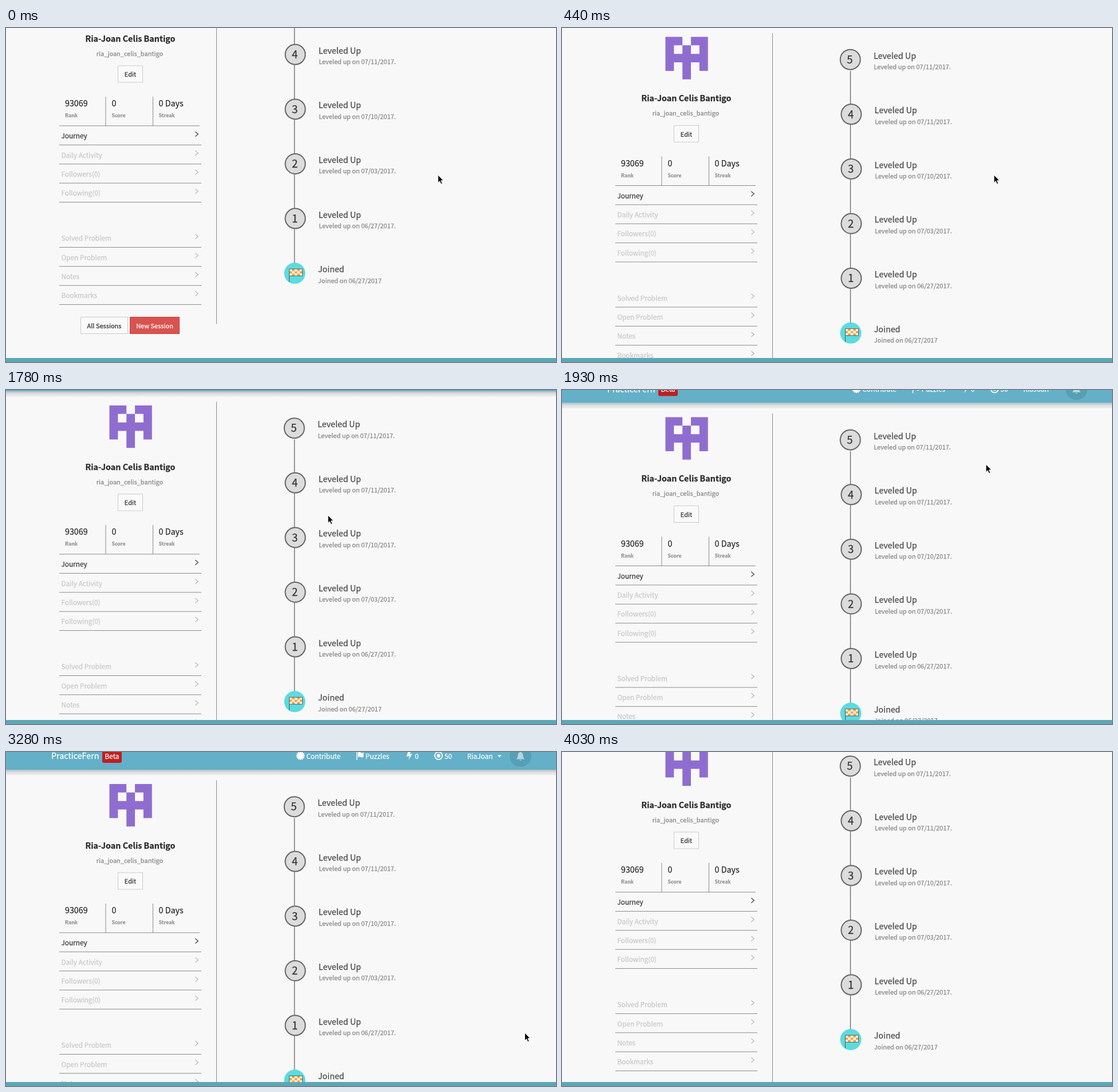
An HTML page that plays this animation: 960 px wide and 584 px high, repeating every 4480 ms.

```html
<!DOCTYPE html>
<html lang="en">
<head>
<meta charset="utf-8">
<title>Profile journey</title>
<style>
  html, body { margin: 0; width: 100%; height: 100%; overflow: hidden; background: #f8f8f8; }
  svg { display: block; width: 960px; height: 584px; }
  text { font-family: "Noto Sans CJK SC", "Noto Sans CJK JP", "Noto Sans CJK", "Open Sans", sans-serif; white-space: pre; stroke-width: .25px; }
</style>
</head>
<body>
<svg id="stage" viewBox="0 0 960 584">
  <defs>
    <linearGradient id="shade" x2="0" y2="1">
      <stop stop-color="#b4bec1"/><stop offset=".45" stop-color="#dcdedf"/><stop offset="1" stop-color="#efefef"/>
    </linearGradient>
  </defs>
  <g id="page"></g>
  <rect y="577" width="960" height="7" fill="#5ba8b5"/>
  <path id="cursor" d="M0 0V13.5L3.1 10.7 5.3 15.7 7.6 14.7 5.4 9.8H9.5Z" fill="#000" stroke="#fff" stroke-width=".9"/>
</svg>
<script>
const page = document.getElementById('page');
const cursor = document.getElementById('cursor');
const LOOP = 4480;

// Page offset: [start ms, y]
const scroll = [
  [0, -104.5], [140, -80], [290, -25], [440, 0], [1780, 11.5],
  [1930, 32], [2230, 40.5], [3580, 2], [3730, -14], [3880, -30.5]
];

// Pointer tip: [start ms, x, y]
const pointer = [
  [0, 754, 257], [740, 356, 296], [890, 235, 113], [1040, 194, 186],
  [1190, 147, 15], [1340, 232, 124], [1490, 276, 173], [1630, 562, 219],
  [1930, 740, 130], [2230, 890, 56], [2380, 882, 53], [2530, 823, -2],
  [2680, 900, 237], [2980, 918, 510], [3130, 926, 533], [3280, 905.5, 491],
  [3880, 928, 566], [4030, -50, -50]
];

let out = '';
const add = s => { out += s; };
const text = (x, y, s, size, fill, extra = '') =>
  add(`<text x="${x}" y="${y}" font-size="${size}" fill="${fill}" stroke="${fill}" ${extra}>${s}</text>`);
const rect = (x, y, w, h, fill, extra = '') =>
  add(`<rect x="${x}" y="${y}" width="${w}" height="${h}" fill="${fill}" ${extra}/>`);
const circle = (x, y, r, fill, extra = '') =>
  add(`<circle cx="${x}" cy="${y}" r="${r}" fill="${fill}" ${extra}/>`);
const path = (d, stroke, width = 1) =>
  add(`<path d="${d}" fill="none" stroke="${stroke}" stroke-width="${width}"/>`);
const shape = (d, fill) => add(`<path d="${d}" fill="${fill}"/>`);

const BIG = 14.3, MENU = 11.85, SMALL = 11;
const MID = 'text-anchor="middle" ', BOLD = 'font-weight="700" ';

function header() {
  rect(0, -9.5, 960, 9.5, 'url(#shade)');
  rect(0, -70, 960, 60.5, '#64b0c8');
  text(79, -28.5, 'PracticeFern', BIG, '#fff');
  rect(168, -46, 34, 24.5, '#bd1f22', 'rx="3"');
  text(185, -29, 'Beta', 11.8, '#fff', MID);

  for (let i = 0; i < 6; i++)
    rect(512.8, -41.3, 2.4, 14.6, '#fff', `transform="rotate(${i * 30} 514 -34)"`);
  circle(514, -34, 5, '#fff');
  text(524.3, -29, 'Contribute', MENU, '#fff');

  path('M612.5 -41V-26.5', '#fff', 1.5);
  shape('M614.3 -39.5Q617 -41.5 619.3 -39.5T624 -40V-32Q621.5 -30 619.3 -31.5T614.3 -31.5Z', '#fff');
  text(627.6, -29, 'Puzzles', MENU, '#fff');

  shape('M702 -41.5H706.5L704.5 -36.5 709 -37.5 702.5 -26.5 704 -33.5 699 -32.5Z', '#fff');
  text(713.7, -29, '0', MENU, '#fff');

  circle(755, -34, 6.6, 'none', 'stroke="#fff" stroke-width="1.8"');
  circle(755, -34, 3.2, '#fff');
  text(765.5, -29, '50', MENU, '#fff');

  text(805, -29, 'RiaJoan', MENU, '#fff');
  shape('M858 -35H865L861.5 -31.3Z', '#fff');
  circle(898, -33.5, 19, '#579fb4');
  shape('M890.5 -28Q893.5 -30.5 893.5 -35Q894 -40 898 -40.5Q902 -40 902.5 -35Q902.5 -30.5 905.5 -28ZM896 -27H900Q898 -24 896 -27Z', '#b4d6e0');
}

function button(x, y, w, h, label, fill, line, ink) {
  rect(x, y, w, h, fill, `stroke="${line}"`);
  text(x + w / 2, y + 19, label, SMALL, ink, MID);
}

function menuRow(label, line, ink, mark) {
  text(96.4, line - 11.3, label, MENU, ink);
  path(`M330.3 ${line - 23.3}L335.3 ${line - 19} 330.3 ${line - 14.7}`, mark, 1.3);
  path(`M93 ${line}H341`, '#8c8c8c');
}

function avatar(x, y, size) {
  let cells = '';
  ['11011', '10101', '11111', '10101', '00100'].forEach((row, j) =>
    [...row].forEach((on, i) => {
      if (+on) cells += `M${x + i * size} ${y + j * size}h${size}v${size}h${-size}z`;
    }));
  shape(cells, '#8f6dd0');
}

function profile() {
  avatar(180.5, 15.5, 14.85);
  text(217, 128, 'Ria-Joan Celis Bantigo', BIG, '#2b2b2b', MID + BOLD);
  text(216, 153.3, 'ria_joan_celis_bantigo', SMALL, '#888', MID);
  button(195.5, 170.5, 43, 29, 'Edit', '#fafafa', '#ccc', '#333');

  [[103, '93069', 'Rank'], [184.5, '0', 'Score'], [266.5, '0 Days', 'Streak']].forEach(([x, value, label]) => {
    text(x, 241.7, value, BIG, '#2b2b2b');
    text(x, 260.5, label, 8.8, '#999', BOLD);
  });
  path('M174 224.5V275.5M256.5 224.5V275.5M93 275.5H338', '#8c8c8c');

  ['Journey', 'Daily Activity', 'Followers(0)', 'Following(0)'].forEach((label, i) =>
    menuRow(label, 309 + i * 33.35, i ? '#c8c8c8' : '#3c3c3c', i ? '#bbb' : '#444'));
  ['Solved Problem', 'Open Problem', 'Notes', 'Bookmarks'].forEach((label, i) =>
    menuRow(label, 488 + i * 33.35, '#c8c8c8', '#bbb'));

  button(130.5, 610, 82, 29, 'All Sessions', '#fafafa', '#ccc', '#333');
  button(216.5, 610, 86, 29, 'New Session', '#d9534f', '#d43f3a', '#fff');
  path('M367.5 9V622', '#8c8c8c');
}

function flag(x, y) {
  rect(x, y, 23, 12, '#fff');
  for (let i = 1; i < 15; i += 2)
    rect(x + (i % 5) * 4.6, y + Math.floor(i / 5) * 4, 4.6, 4, '#f5a33c');
  path(`M${x} ${y + 23}V${y}h23v12h-23`, '#555');
}

function timeline() {
  path('M503.5 75V520', '#777', 1.5);
  ['07/11', '07/11', '07/10', '07/03', '06/27'].forEach((day, i) => {
    const y = 55.2 + i * 95.6, dx = i ? 1.7 : 0;
    circle(503.2 + dx, y, 17.5, '#dcdcdc', 'stroke="#666" stroke-width="2"');
    text(502.4 + dx, y + 6.7, 5 - i, 18.5, '#333', MID);
    text(543.9 + dx, y - 1.6, 'Leveled Up', BIG, '#4c4c4c');
    text(544.2 + dx, y + 16.9, `Leveled up on ${day}/2017.`, SMALL, '#888');
  });
  circle(504, 533.3, 18.5, '#5cdbe0');
  flag(494.5, 525.8);
  text(544.7, 531.6, 'Joined', BIG, '#4c4c4c');
  text(544.6, 550, 'Joined on 06/27/2017', SMALL, '#888');
}

header();
profile();
timeline();
page.innerHTML = out;

const at = (steps, t) => steps.findLast(step => step[0] <= t);

function draw(now) {
  const t = now % LOOP;
  const [, y] = at(scroll, t);
  const [, px, py] = at(pointer, t);
  page.setAttribute('transform', `translate(0 ${y})`);
  cursor.setAttribute('transform', `translate(${px} ${py})`);
}

const start = performance.now();
function tick() {
  draw(performance.now() - start);
  requestAnimationFrame(tick);
}
tick();
</script>
</body>
</html>
```
